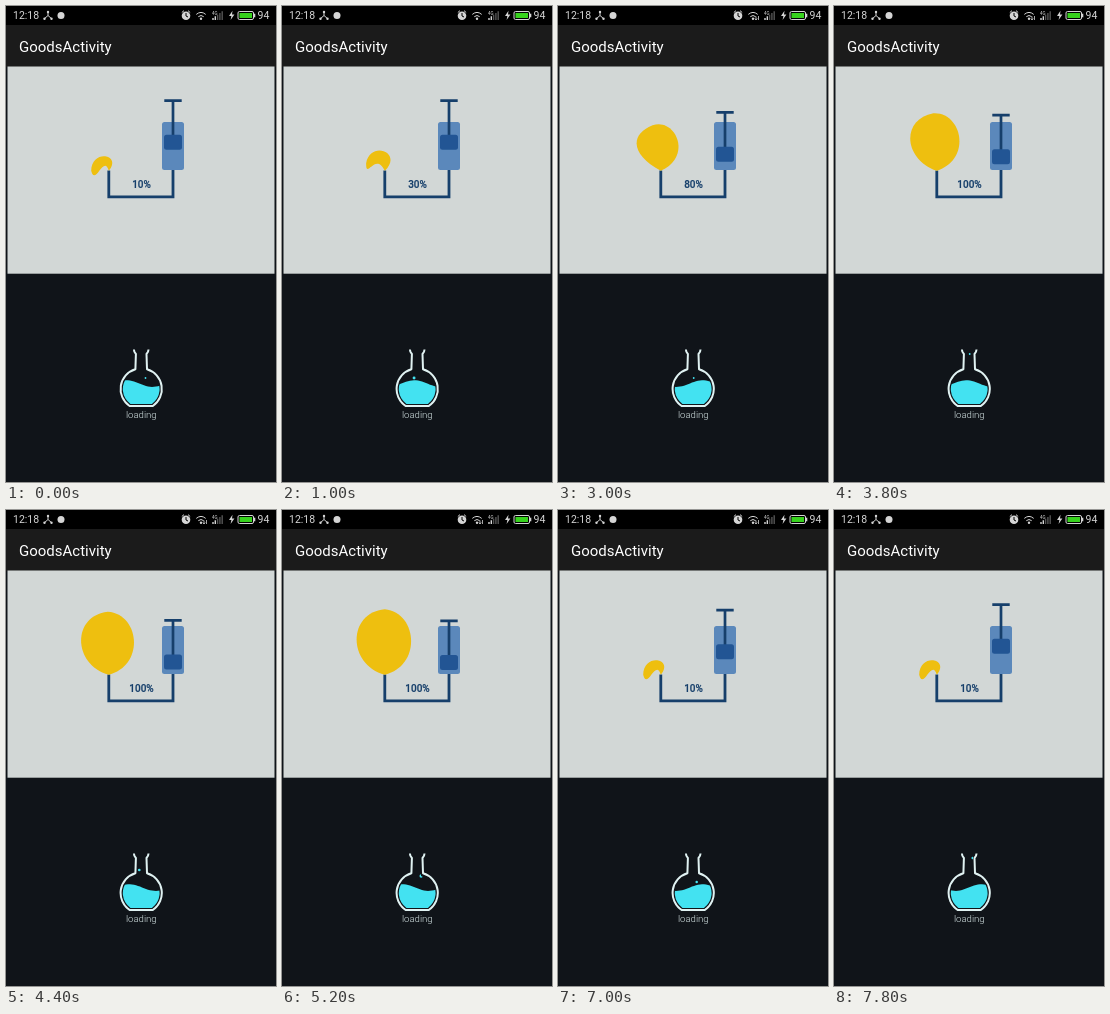
Recreate the animation shown at these times as an HTML page. Size 270 px wide and 476 px high, loop 8000 ms.

```html
<!DOCTYPE html>
<html lang="en">
<head>
<meta charset="utf-8">
<title>Loading indicators</title>
<style>
  html, body { margin: 0; width: 100%; height: 100%; overflow: hidden; background: #101419; }
  svg { display: block; width: 100vw; height: 100vh; }
  text { font-family: Roboto, sans-serif; }
  .line { fill: none; stroke: #d5d5d5; stroke-width: 1; }
</style>
</head>
<body>
<svg viewBox="0 0 270 476">
  <defs>
    <clipPath id="bulb"><path d="M124.5 398A18.4 18.4 0 1 1 145.9 398Z"/></clipPath>
    <clipPath id="inside"><path d="M131 345H139V366A18.4 18.4 0 0 1 145.9 398H124.5A18.4 18.4 0 0 1 131 366Z"/></clipPath>
  </defs>

  <rect width="270" height="476" fill="#101419"/>
  <rect width="270" height="19" fill="#000"/>
  <rect y="19" width="270" height="42" fill="#1b1b1b"/>
  <rect x="1.5" y="60.5" width="267" height="207.2" fill="#d2d7d6"/>

  <!-- status bar -->
  <g fill="#d5d5d5" font-size="10.5">
    <text x="7" y="13.2">12:18</text>
    <text x="251.5" y="13.2">94</text>
    <path class="line" d="M42 5.5V9.5L38 13M42 9.5L46 13"/>
    <circle cx="42" cy="6" r="1.2"/><circle cx="38.5" cy="12.7" r="1.2"/><circle cx="45.5" cy="12.7" r="1.2"/>
    <circle cx="55" cy="9.5" r="3.5"/>
    <circle cx="180" cy="9.7" r="4.3"/>
    <path d="M180 7V10L182 11" fill="none" stroke="#000"/>
    <path class="line" d="M175.8 6.5L178 4.6M184.2 6.5L182 4.6"/>
    <path class="line" d="M190.3 8.4Q195 4.4 199.7 8.4M192.3 10.7Q195 8.3 197.7 10.7"/>
    <circle cx="195" cy="12.7" r="1.2"/>
    <path id="traffic" d="M198 14V10.5M196.8 12.5L198 14L199.2 12.5M200.5 10V14" fill="none" stroke="#d5d5d5" stroke-width=".8"/>
    <text x="206" y="8.5" font-size="4.5">4G</text>
    <path d="M207 14V12M209.3 14V10.3" stroke="#d5d5d5" stroke-width="1.4"/>
    <path d="M211.6 14V8.7M213.9 14V7M216.2 14V5.3" stroke="#555" stroke-width="1.4"/>
    <path d="M226.5 4.8L223 10H225.4L224.6 14L228.4 8.6H226Z"/>
    <rect x="232" y="5.5" width="15.5" height="8" rx="1.5" class="line"/>
    <rect x="233.5" y="7" width="12.5" height="5" fill="#37d21d"/>
    <rect x="248" y="7.7" width="1.3" height="3.6"/>
  </g>
  <text x="13" y="45.7" font-size="15" fill="#fff">GoodsActivity</text>

  <!-- balloon and pump -->
  <path d="M102.8 164.5V190.9H167V164" fill="none" stroke="#163f6b" stroke-width="2.8"/>
  <path id="balloon" fill="#eebf0f"/>
  <rect x="156" y="116" width="22" height="48" rx="2.5" fill="#5b88bb"/>
  <g id="plunger">
    <path d="M158.3 94.6H175.7M167 94.6V130" fill="none" stroke="#163f6b" stroke-width="2.7"/>
    <rect x="158" y="128.8" width="18" height="15" rx="2.5" fill="#225594"/>
  </g>
  <text id="percent" x="135.5" y="181.8" text-anchor="middle" font-size="10" font-weight="500" fill="#163f6b" stroke="#163f6b" stroke-width=".2"></text>

  <!-- flask -->
  <path id="water" fill="#43e2f1" clip-path="url(#bulb)"/>
  <g id="bubbles" fill="#43e2f1" clip-path="url(#inside)"></g>
  <path d="M127.9 343.5Q127.9 346 129.9 348L129.4 363.2A20.6 20.6 0 0 0 123.6 400H146.8A20.6 20.6 0 0 0 141 363.2L140.5 348Q142.5 346 142.5 343.5"
    fill="none" stroke="#e0f2f2" stroke-width="2" stroke-linejoin="round"/>
  <text x="135.3" y="411.8" text-anchor="middle" font-size="9.6" font-weight="300" fill="#d7e6e6">loading</text>
</svg>

<script>
const LOOP = 8000, STEP = 200;
const DEFLATE = 5600, REFILL = 2100, PLUNGER_TRAVEL = 16.3;
const BUBBLE_COUNT = 8, BUBBLE_SPEED = .03;
const el = id => document.getElementById(id);

const progress = (t, start, end) => Math.min(1, Math.max(0, (t - start) / (end - start)));
const easeOut = x => 1 - (1 - x) ** 2;

const dots = Array.from({ length: BUBBLE_COUNT }, (_, i) => {
  const dot = document.createElementNS('http://www.w3.org/2000/svg', 'circle');
  dot.setAttribute('cx', 135.5 + 4 * Math.cos(2.6 * i));
  dot.setAttribute('r', 1.3 - .4 * Math.cos(2 * i));
  return el('bubbles').appendChild(dot);
});

// Limp at p = 0, round at p = 1; control points relative to the nozzle
function balloonPath(p) {
  const size = .38 + .62 * p, w = 51.5 * size, h = 65.5 * size;
  const at = (x, dx, y, dy) =>
    `${(102.8 + w * (x + dx * p)).toFixed(2)} ${(164.8 + h * (y + dy * p)).toFixed(2)} `;
  return 'M' + at(0, 0, 0, 0) +
    'C' + at(-.25, -.48, -.7, .55) + at(-.7, -.03, .65, -1.6) + at(-.9, .9, 0, -1) +
    'C' + at(-.88, 1.51, -.9, -.05) + at(.7, .03, -.65, .5) + at(0, 0, 0, 0) + 'Z';
}

function wavePath(t) {
  const crest = 134 + 14 * Math.cos(2 * Math.PI * (t - 2400) / 5200);
  let d = 'M114 402';
  for (let x = 114; x <= 156; x += 2) {
    const y = 377.6 - 3.3 * Math.cos(2 * Math.PI * (x - crest) / 52);
    d += `L${x} ${y.toFixed(2)}`;
  }
  return d + 'L156 402Z';
}

function draw(t) {
  const inflation = t < DEFLATE ? easeOut(progress(t, 450, 5100)) : 0;
  const pushed = easeOut(progress(t, 1000, 5200)) - progress(t, DEFLATE, DEFLATE + REFILL);
  el('balloon').setAttribute('d', balloonPath(inflation));
  el('plunger').setAttribute('transform', `translate(0 ${PLUNGER_TRAVEL * pushed})`);
  el('percent').textContent = Math.min(100, Math.floor(inflation * 10) * 10 + 10) + '%';
  el('traffic').style.display = t >= 3000 && t < 7600 ? '' : 'none';
  el('water').setAttribute('d', wavePath(t));

  // One bubble leaves the surface every second
  dots.forEach((dot, i) => {
    const age = (t + 200 - 1000 * i + LOOP) % LOOP;
    dot.setAttribute('cy', 378 - age * BUBBLE_SPEED);
  });
}

function frame(now) {
  draw(Math.floor(now / STEP) * STEP % LOOP);
  requestAnimationFrame(frame);
}
draw(0);
requestAnimationFrame(frame);
</script>
</body>
</html>
```
